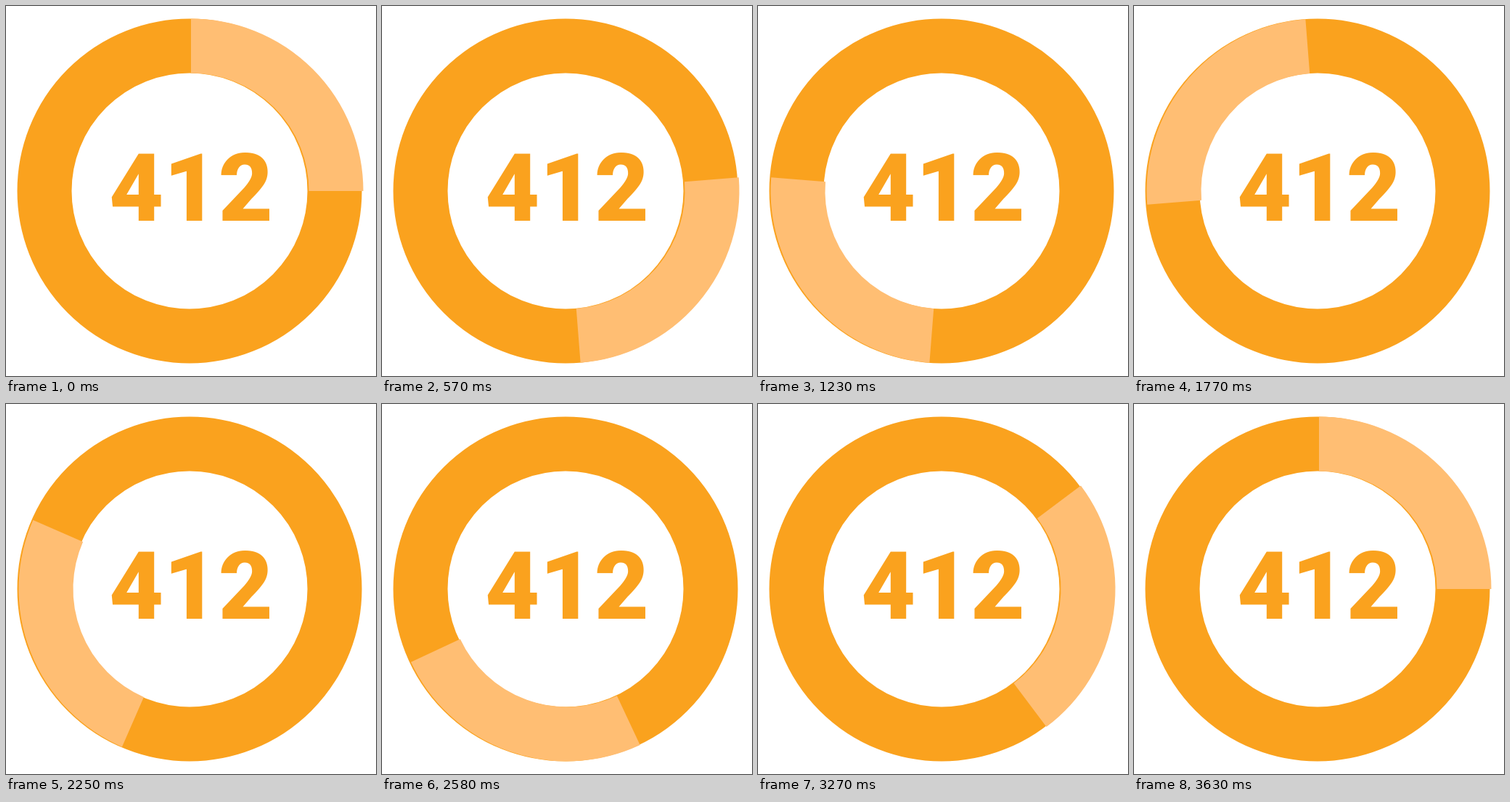
Write an HTML page that moves like this. It is 510 by 510 pixels and loops after 3.66 s.

```html
<!DOCTYPE html>
<html lang="en">
<head>
<meta charset="utf-8">
<title>Ring counter</title>
<style>
  html, body { margin: 0; height: 100%; overflow: hidden; background: #fff; }
  svg { display: block; width: 100%; height: 100%; }
  circle, path { fill: none; stroke-width: 75; }
  text { font: 900 130px Roboto, sans-serif; text-anchor: middle; }
</style>
</head>
<body>
<svg viewBox="0 0 510 510">
  <circle cx="253" cy="255" r="200" stroke="#faa21e"/>
  <path id="arc" d="M255 55A200 200 0 0 1 455 255" stroke="#ffbe73"/>
  <text x="255" y="296" fill="#faa21e">412</text>
</svg>
<script>
  const STEP = 30, UP = 60, DOWN = 61, SWEEP = 270;
  const arc = document.getElementById('arc');

  function draw() {
    const step = Math.floor(performance.now() / STEP) % (UP + DOWN + 1);
    const part = step <= UP ? step / UP : (UP + DOWN - step) / DOWN;
    arc.setAttribute('transform', `rotate(${SWEEP * part} 255 255)`);
    requestAnimationFrame(draw);
  }
  draw();
</script>
</body>
</html>
```
